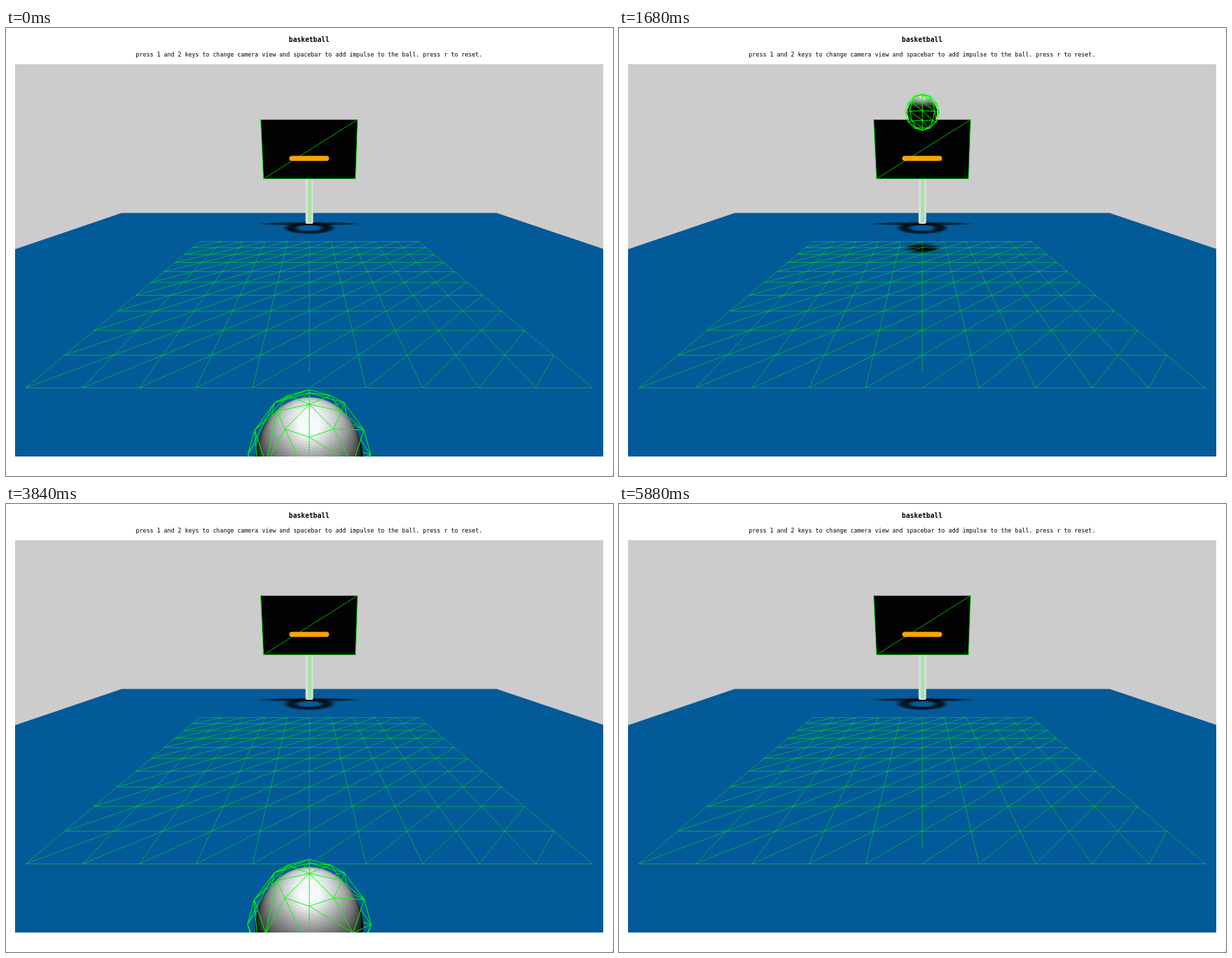
An HTML page with a canvas for the animation above (6 s loop, 871 by 643 pixels).

```html
<!DOCTYPE html>
<html lang="en">
<head>
<meta charset="utf-8">
<title>basketball</title>
<style>
  html, body { margin: 0; width: 100%; height: 100%; overflow: hidden; background: #fff; }
  canvas { position: absolute; left: 0; top: 0; }
  p { position: absolute; left: 0; width: 870px; margin: 0; text-align: center; white-space: nowrap;
      color: #000; font-family: "DejaVu Sans Mono", monospace; z-index: 1; }
  .title { top: 10px; font-size: 9.7px; line-height: 13px; font-weight: bold; }
  .hint { top: 32px; font-size: 8.36px; line-height: 12px; }
</style>
</head>
<body>
<p class="title">basketball</p>
<p class="hint">press 1 and 2 keys to change camera view and spacebar to add impulse to the ball. press r to reset.</p>
<canvas id="stage" width="871" height="643"></canvas>
<script>
const ctx = document.getElementById('stage').getContext('2d');
const LOOP = 6000, STEP = 120;
const CX = 435.2, CY = 333.5, FOCAL = 487.6, PITCH = 0.3157, EYE = 4;
const SIN = Math.sin(PITCH), COS = Math.cos(PITCH);
const WIRE_R = 0.63, BALL_R = 0.54;
const EDGE_DEPTH = 22.6, BOARD_DEPTH = 18.8, HOOP_DEPTH = 16.5;
const HOME = 2.7, REST = 1.1, FLOOR = 0.9;

// seconds at which each phase begins
const THROW_1 = 0.745, BOUNCE = 2.29, RESET = 3.35, THROW_2 = 4.44;

const rise = (y, v, g, s) => y + v * s - g * s * s / 2;

// ball centre as [x, height, depth]
function ballAt(t) {
  if (t < THROW_1) return [0, REST - 0.08 * Math.exp(-20 * t), HOME];
  if (t < BOUNCE) {
    const s = t - THROW_1;
    return [0, Math.max(FLOOR, rise(REST, 11.53, 15, s)), Math.min(17, HOME + 12 * s)];
  }
  if (t < RESET) {
    const s = t - BOUNCE;
    return [-Math.min(0.3, 1.04 * s), Math.max(FLOOR, rise(FLOOR, 8.27, 25, s)), 17 - 0.6 * s];
  }
  if (t < THROW_2) return [0, Math.max(REST, rise(3.9, 0, 25, t - RESET)), HOME];
  const s = t - THROW_2;
  return [0, rise(REST, 18.46, 30.2, s), HOME + 15.78 * s];
}

// points are [x, height, depth]
function project([x, y, d]) {
  const drop = EYE - y, z = d * COS + drop * SIN;
  return [CX + FOCAL * x / z, CY - FOCAL * (d * SIN - drop * COS) / z];
}
const dot = (a, b) => a[0] * b[0] + a[1] * b[1] + a[2] * b[2];
const unit = a => { const l = Math.hypot(...a); return a.map(v => v / l); };
const toEye = p => [-p[0], EYE - p[1], -p[2]];
const around = (c, n, r) => c.map((v, i) => v + n[i] * r);
const normal = (u, v) => {
  const phi = u * 2 * Math.PI, th = v * Math.PI;
  return [-Math.cos(phi) * Math.sin(th), Math.cos(th), -Math.sin(phi) * Math.sin(th)];
};

function path(points, closed) {
  ctx.beginPath();
  points.forEach(p => ctx.lineTo(p[0], p[1]));
  if (closed) ctx.closePath();
}
function fill(points, color) {
  path(points, true);
  ctx.fillStyle = color;
  ctx.fill();
}
function stroke(color, width) {
  ctx.strokeStyle = color;
  ctx.lineWidth = width;
  ctx.stroke();
}

// wire sphere of 8 by 6 segments
const edges = [];
for (let i = 0; i < 6; i++) {
  for (let j = 0; j < 8; j++) {
    const v = (a, b) => normal(a / 8, b / 6);
    edges.push([v(j, i), v(j, i + 1)]);
    if (i) edges.push([v(j, i), v(j + 1, i)]);
    if (i && i < 5) edges.push([v(j, i), v(j + 1, i + 1)]);
  }
}

// edges are cut into pieces so each lies before or behind the ball
function drawWire(c, front) {
  const eye = toEye(c), cut = 6;
  ctx.beginPath();
  for (const [a, b] of edges) {
    const at = k => around(c, a.map((v, i) => v + (b[i] - v) * k), WIRE_R);
    let open = false;
    for (let s = 0; s < cut; s++) {
      const mid = at((s + 0.5) / cut);
      const near = dot(mid.map((v, i) => v - c[i]), eye) >= BALL_R * BALL_R;
      if (near !== front) { open = false; continue; }
      if (!open) ctx.moveTo(...project(at(s / cut)));
      ctx.lineTo(...project(at((s + 1) / cut)));
      open = true;
    }
  }
  stroke('#00ff00', 1);
}

function shade(n, eye) {
  const half = unit([eye[0], eye[1] + 1, eye[2]]);
  const lit = Math.max(0, (n[1] - 0.1) / 0.9);
  const shine = n[1] > 0 ? Math.pow(Math.max(0, dot(n, half)), 16) : 0;
  return 0.95 * Math.pow(lit, 1.25) + 0.18 * shine;
}

function drawSphere(c) {
  const cols = 64, rows = 80;
  const light = c[2] > 16 && c[1] < 3.6 ? 0.6 : 1;
  for (let i = 0; i < rows; i++) {
    for (let j = 0; j < cols; j++) {
      const n = normal((j + 0.5) / cols, (i + 0.5) / rows);
      const eye = unit(toEye(around(c, n, BALL_R)));
      if (dot(n, eye) < -0.02) continue;
      const g = Math.min(255, Math.round(255 * light * shade(n, eye)));
      const corner = (a, b) => project(around(c, normal((j + a) / cols, (i + b) / rows), BALL_R));
      fill([corner(0, 0), corner(1, 0), corner(1, 1), corner(0, 1)], `rgb(${g},${g},${g})`);
      stroke(ctx.fillStyle, 0.5);
    }
  }
}

function drawBall(c) {
  drawWire(c, false);
  drawSphere(c);
  drawWire(c, true);
}

// dark ellipse whose opacity follows a function of the radius
function softEllipse(x, y, rx, ry, alpha) {
  ctx.save();
  ctx.translate(x, y);
  ctx.scale(rx, ry);
  const g = ctx.createRadialGradient(0, 0, 0, 0, 0, 1);
  for (let k = 0; k <= 16; k++) g.addColorStop(k / 16, `rgba(0,3,8,${alpha(k / 16)})`);
  ctx.fillStyle = g;
  ctx.fillRect(-1, -1, 2, 2);
  ctx.restore();
}
const smooth = (a, b, v) => {
  const k = Math.min(1, Math.max(0, (v - a) / (b - a)));
  return k * k * (3 - 2 * k);
};

function drawShadows([x, y, d]) {
  softEllipse(435, 281, 79, 2.6, r => 0.6 * smooth(1, 0.7, r));
  softEllipse(435, 287, 40, 9.5, r => 0.8 * smooth(0.3, 0.6, r) * smooth(1, 0.7, r));
  if (d < 4 || d > EDGE_DEPTH || y < 0) return;
  const [sx, sy] = project([x, 0, d]), r = 0.93;
  const rx = project([x + r, 0, d])[0] - sx;
  const ry = (project([x, 0, d - r])[1] - project([x, 0, d + r])[1]) / 2;
  softEllipse(sx, sy, rx, ry, k => smooth(1, 0.25, k));
}

function drawGrid() {
  ctx.beginPath();
  const line = (a, b) => { ctx.moveTo(...a); ctx.lineTo(...b); };
  const spot = (j, i) => project([j - 5, 0, i + 5]);
  for (let i = 0; i <= 10; i++) {
    line(spot(0, i), spot(10, i));
    line(i === 5 ? [CX, 493] : spot(i, 0), spot(i, 10));
    for (let j = 0; j < 10 && i < 10; j++) line(spot(j, i), spot(j + 1, i + 1));
  }
  stroke('rgba(0,255,0,0.52)', 0.9);
}

function drawBoard() {
  ctx.fillStyle = '#dcdcdc';
  ctx.beginPath();
  ctx.roundRect(429.8, 210, 11, 71, 2);
  ctx.fill();
  ctx.fillStyle = '#9be69b';
  ctx.fillRect(433.5, 216, 4.5, 63);

  const board = [[365.5, 131.5], [504.5, 131.5], [501.5, 216.5], [369.5, 216.5]];
  fill(board, '#020202');
  stroke('#00e000', 1);
  path([board[3], board[1]]);
  stroke('#00b400', 1);
}

function drawHoop() {
  path([[410, 187.1], [460, 187.1]]);
  ctx.lineCap = 'round';
  stroke('#ffa500', 7.2);
  ctx.lineCap = 'butt';
}

function draw(t) {
  const ball = ballAt(t / 1000), d = ball[2];
  ctx.clearRect(0, 0, 871, 643);
  ctx.fillStyle = '#777';
  ctx.fillRect(870, 641, 1, 1);
  ctx.save();
  ctx.beginPath();
  ctx.rect(13, 52, 844, 563);
  ctx.clip();
  ctx.fillStyle = '#cccccc';
  ctx.fillRect(13, 52, 844, 563);
  if (d > EDGE_DEPTH) drawBall(ball);
  fill([[166, 265.6], [704, 265.6], [857, 317], [857, 615], [13, 615], [13, 317.5]], '#035a98');
  drawShadows(ball);
  drawGrid();
  if (d > BOARD_DEPTH && d <= EDGE_DEPTH) drawBall(ball);
  drawBoard();
  if (d <= HOOP_DEPTH) drawHoop();
  if (d <= BOARD_DEPTH) drawBall(ball);
  if (d > HOOP_DEPTH) drawHoop();
  ctx.restore();
}

const start = performance.now();
let shown = -1;
function tick() {
  const t = Math.floor((performance.now() - start) % LOOP / STEP) * STEP;
  if (t !== shown) draw(shown = t);
  requestAnimationFrame(tick);
}
tick();
</script>
</body>
</html>
```
